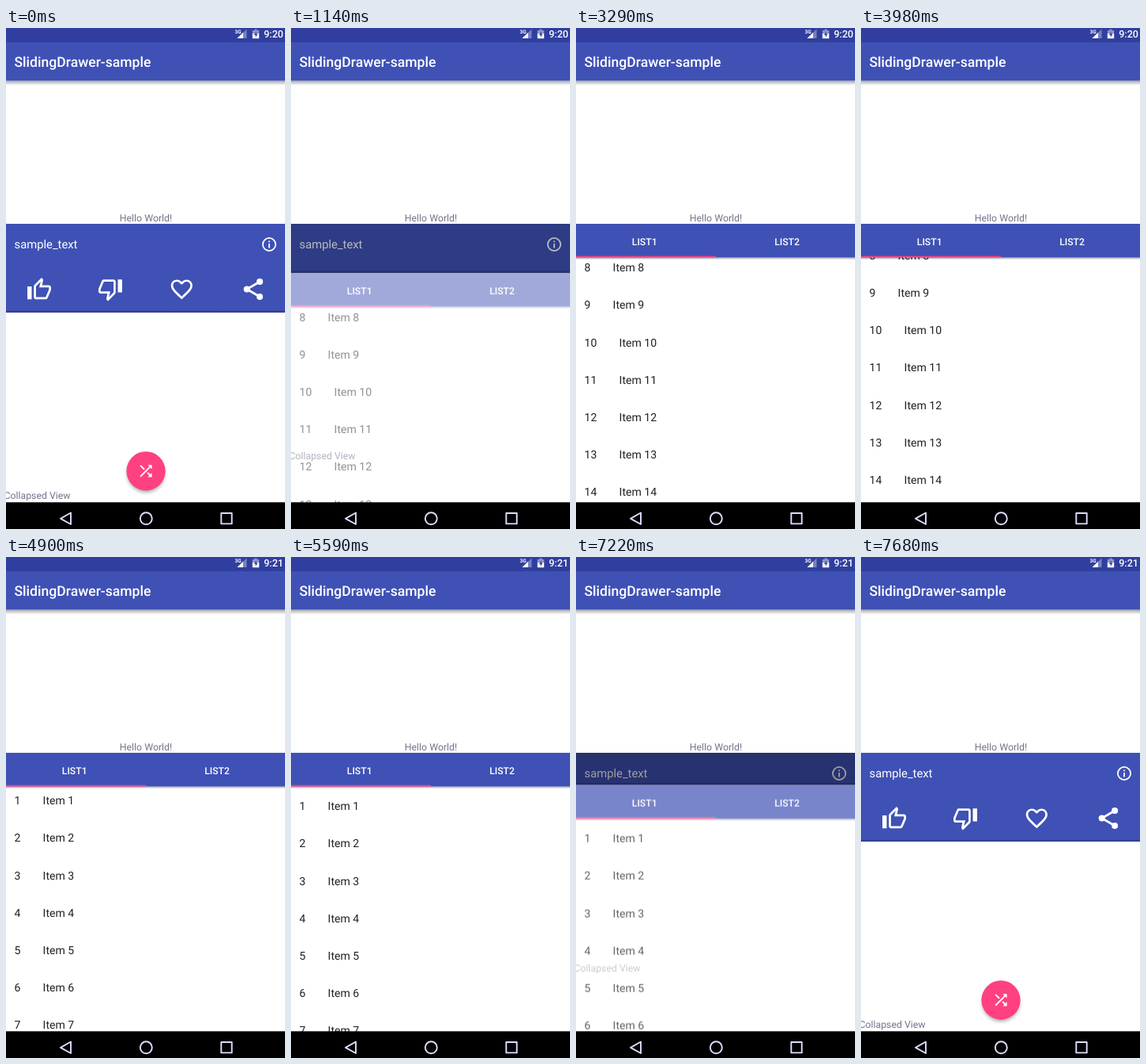
Write an HTML page that moves like this. It is 353 px wide and 632 px high and loops after 8 s.

```html
<!DOCTYPE html>
<html lang="en">
<head>
<meta charset="utf-8">
<title>SlidingDrawer-sample</title>
<style>
html, body { margin: 0; width: 100%; height: 100%; overflow: hidden; background: #fff; }
svg { display: block; width: 100%; height: 100%; font-family: Roboto, sans-serif; text-rendering: geometricPrecision; }
.small { font-size: 12.3px; fill: #73738c; }
.tab { font-size: 12.2px; font-weight: 500; fill: #fff; text-anchor: middle; }
#rows { font-size: 14.1px; fill: #212121; }
</style>
</head>
<body>
<svg viewBox="0 0 353 632">
  <defs>
    <linearGradient id="fall" x2="0" y2="1">
      <stop stop-color="#000" stop-opacity=".34"/><stop offset="1" stop-color="#000" stop-opacity="0"/>
    </linearGradient>
    <linearGradient id="rise" x2="0" y2="1">
      <stop stop-color="#000" stop-opacity="0"/><stop offset="1" stop-color="#000" stop-opacity=".3"/>
    </linearGradient>
    <filter id="blur" x="-30%" y="-30%" width="160%" height="160%"><feGaussianBlur stdDeviation="2.4"/></filter>
    <clipPath id="stage"><rect y="247" width="353" height="352"/></clipPath>
    <clipPath id="listArea"><rect y="42" width="353" height="320"/></clipPath>
    <path id="thumb" d="M9 21h9c.83 0 1.54-.5 1.84-1.22l3.02-7.05c.09-.23.14-.47.14-.73v-2c0-1.1-.9-2-2-2h-6.31l.95-4.57.03-.32c0-.41-.17-.79-.44-1.06L14.17 1 7.58 7.59C7.22 7.95 7 8.45 7 9v10c0 1.1.9 2 2 2zM9 9l4.34-4.34L12 10h9v2l-3 7H9zM1 9h4v12H1z"/>
  </defs>
  <rect width="353" height="632" fill="#fff"/>

  <!-- app bar -->
  <rect y="66.5" width="353" height="6" fill="url(#fall)"/>
  <rect width="353" height="66.5" fill="#3f51b5"/>
  <rect width="353" height="18" fill="#303f9f"/>
  <text x="10.4" y="49" font-size="17.6" font-weight="500" fill="#fff">SlidingDrawer-sample</text>
  <g fill="#fff">
    <text x="289.5" y="6.5" font-size="6.5" font-weight="700">3G</text>
    <path d="M304.5 1.5V13H292.5z" opacity=".35"/>
    <path d="M300 5.8V13H292.5z"/>
    <path d="M314.5 1.5h3V3h2.7v4h-8.4V3h2.7z" opacity=".45"/>
    <path d="M311.8 7h8.4v6.2h-8.4z"/>
    <path d="M316.7 4.5l-3 4.2h2v3l3-4.2h-2z" fill="#303f9f"/>
    <text id="clock" x="351" y="12.3" font-size="12.6" font-weight="500" text-anchor="end"></text>
  </g>

  <text class="small" x="177" y="244" text-anchor="middle">Hello World!</text>

  <g clip-path="url(#stage)">
    <!-- header -->
    <rect y="247" width="353" height="112" fill="#3f51b5"/>
    <g fill="#fff">
      <text x="10.5" y="277.5" font-size="14.8">sample_text</text>
      <path transform="translate(322.2 262.2) scale(.9)" d="M11 17h2v-6h-2zm1-15a10 10 0 1 0 0 20a10 10 0 1 0 0-20zm0 18a8 8 0 1 1 0-16a8 8 0 1 1 0 16zM11 9h2V7h-2z"/>
      <use href="#thumb" transform="translate(25.7 313.7) scale(1.36)"/>
      <use href="#thumb" transform="translate(148.3 345.8) scale(-1.36)"/>
      <path transform="translate(206 313.3) scale(1.36)" d="M16.5 3c-1.74 0-3.41.81-4.5 2.09C10.91 3.81 9.24 3 7.5 3 4.42 3 2 5.42 2 8.5c0 3.78 3.4 6.86 8.55 11.54L12 21.35l1.45-1.32C18.6 15.36 22 12.28 22 8.5 22 5.42 19.58 3 16.5 3zm-4.4 15.55l-.1.1-.1-.1C7.14 14.24 4 11.39 4 8.5 4 6.5 5.5 5 7.5 5c1.54 0 3.04.99 3.57 2.36h1.87C13.46 5.99 14.96 5 16.5 5c2 0 3.5 1.5 3.5 3.5 0 2.89-3.14 5.74-7.9 10.05z"/>
      <g transform="translate(296.6 313.2) scale(1.36)">
        <path d="M18 5L6 12l12 7" fill="none" stroke="#fff" stroke-width="2"/>
        <circle cx="18" cy="5" r="3"/><circle cx="6" cy="12" r="3"/><circle cx="18" cy="19" r="2.92"/>
      </g>
    </g>
    <rect id="scrim" y="247" width="353" height="112"/>

    <!-- drawer -->
    <g id="drawer">
      <rect y="-3.5" width="353" height="3.5" fill="url(#rise)"/>
      <rect width="353" height="360" fill="#fff"/>
      <g id="expanded">
        <g clip-path="url(#listArea)"><g id="rows"></g></g>
        <rect y="42.5" width="353" height="3" fill="url(#fall)"/>
        <rect width="353" height="42.5" fill="#3f51b5"/>
        <rect y="40.7" width="177" height="1.8" fill="#ff4081"/>
        <text class="tab" x="86.7" y="26.5">LIST1</text>
        <text class="tab" x="267" y="26.5">LIST2</text>
      </g>
      <text id="collapsed" class="small" x="-2.5" y="235.2">Collapsed View</text>
    </g>
    <g id="fab">
      <circle cx="177" cy="562" r="23.5" opacity=".38" filter="url(#blur)"/>
      <circle cx="177" cy="558.8" r="24.6" fill="#ff4081"/>
      <path transform="translate(165.6 547.4) scale(.95)" fill="#fff" d="M10.59 9.17L5.41 4 4 5.41l5.17 5.17zM14.5 4l2.04 2.04L4 18.59 5.41 20 17.96 7.46 20 9.5V4zm.33 9.41l-1.41 1.41 3.13 3.13L14.5 20H20v-5.5l-2.04 2.04z"/>
    </g>
  </g>

  <!-- navigation bar -->
  <rect y="598.3" width="353" height="33.7"/>
  <g fill="none" stroke="#dedcff" stroke-width="1.9" stroke-linejoin="round">
    <path d="M82 611.5v14.5L69 618.8z"/>
    <circle cx="177.3" cy="618.8" r="7.5"/>
    <rect x="272.3" y="612" width="13.4" height="13.4"/>
  </g>
</svg>
<script>
const LOOP = 8000, OPEN_Y = 247, TRAVEL = 112, ROW = 47.2, ROWS = 24;
const $ = id => document.getElementById(id);
const linear = u => u;
const easeOut = u => 1 - (1 - u) ** 3;
const easeIn = u => u ** 1.3;

// keys: [time, value, easing towards this key]
const slide = [[450, 0], [1140, .446, easeIn], [1290, .58], [1570, 1, easeOut],
  [6880, 1], [7350, .5], [7630, 0, easeOut]];
const scroll = [[3290, 342], [3600, 375, easeOut], [3840, 375], [3980, 359, easeIn],
  [4390, 190, easeOut], [4630, 190], [4900, 7], [4950, 0]];

function at(keys, t) {
  if (t <= keys[0][0]) return keys[0][1];
  for (let i = 1; i < keys.length; i++) {
    const [t0, v0] = keys[i - 1], [t1, v1, ease = linear] = keys[i];
    if (t < t1) return v0 + (v1 - v0) * ease((t - t0) / (t1 - t0));
  }
  return keys[keys.length - 1][1];
}

let rows = '';
for (let n = 1; n <= ROWS; n++) {
  const y = (72.1 + (n - 1) * ROW).toFixed(1);
  rows += `<text x="10.5" y="${y}">${n}</text><text x="${n < 10 ? 46.6 : 54.6}" y="${y}">Item ${n}</text>`;
}
$('rows').innerHTML = rows;

function draw(t) {
  const p = at(slide, t);
  $('clock').textContent = t < 4200 ? '9:20' : '9:21';
  $('drawer').setAttribute('transform', `translate(0 ${OPEN_Y + TRAVEL * (1 - p)})`);
  $('rows').setAttribute('transform', `translate(0 ${-at(scroll, t)})`);
  $('expanded').setAttribute('opacity', Math.min(1, p * 1.1));
  $('collapsed').setAttribute('opacity', 1 - p);
  $('scrim').setAttribute('opacity', p * .6);
  $('fab').setAttribute('visibility', t < 500 || t >= 7680 ? 'visible' : 'hidden');
}

const start = performance.now();
function tick() {
  draw((performance.now() - start) % LOOP);
  requestAnimationFrame(tick);
}
tick();
</script>
</body>
</html>
```
